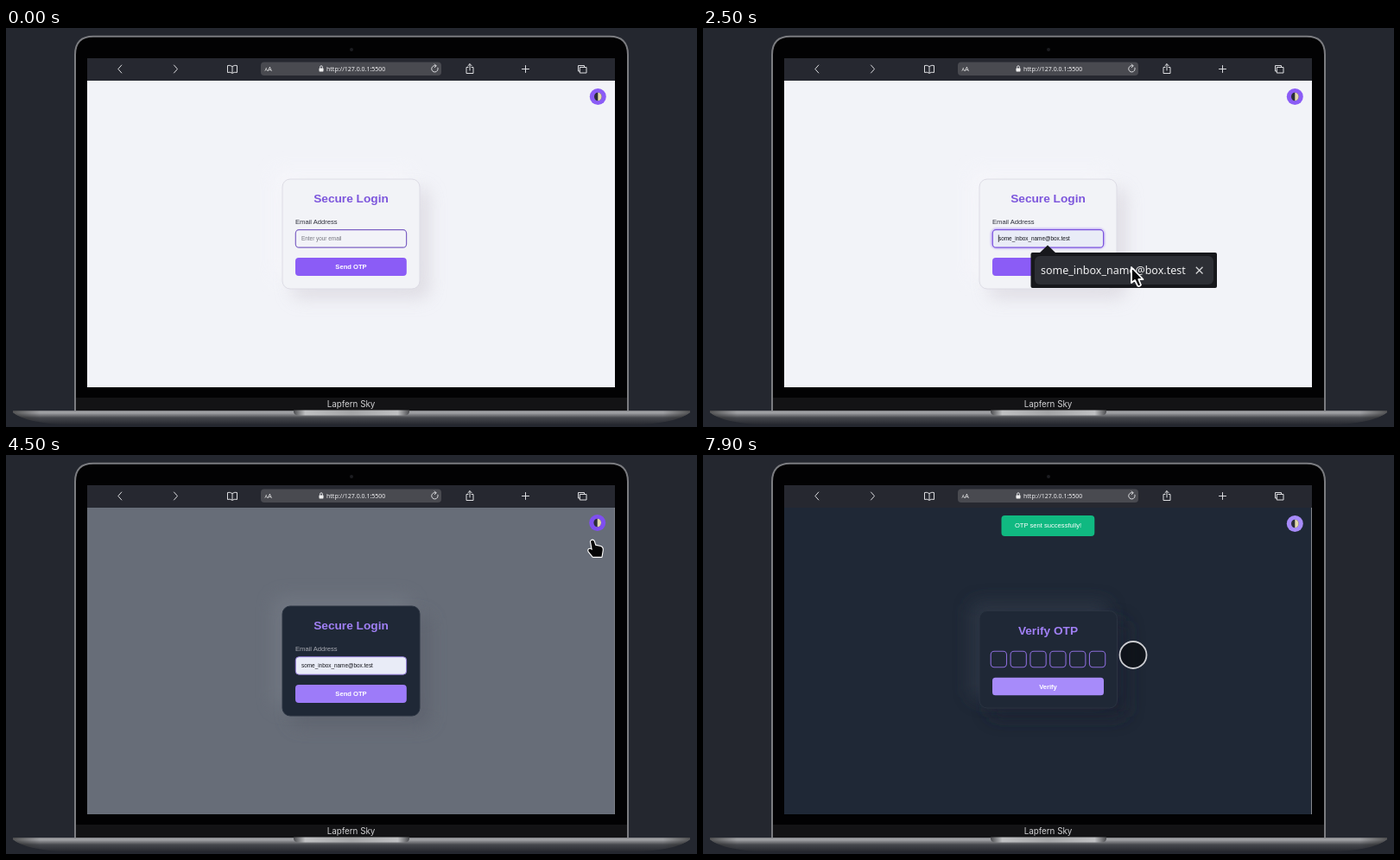
These frames come from a looping animation (800 px wide and 462 px high, 8000 ms). An HTML page:

```html
<!DOCTYPE html>
<html lang="en">
<head>
<meta charset="utf-8">
<title>Secure Login</title>
<style>
html, body { margin: 0; width: 100%; height: 100%; overflow: hidden; background: #24272f; }
svg { display: block; width: 100%; height: 100%; }
text { font-family: "Liberation Sans", Arial, sans-serif; font-size: 7.6px; }
.mid { text-anchor: middle; }
.bold { font-weight: 700; }
.title { font-size: 13.7px; font-weight: 700; text-anchor: middle; }
.small { font-size: 6.4px; }
.ui { font-family: "Noto Sans", "Open Sans", sans-serif; }
.line { fill: none; stroke: #dcdde0; stroke-width: 1; stroke-linecap: round; stroke-linejoin: round; }
</style>
</head>
<body>
<svg viewBox="0 0 800 462" xmlns="http://www.w3.org/2000/svg">
  <defs>
    <linearGradient id="metal" x2="0" y2="1">
      <stop offset="0" stop-color="#85868a"/><stop offset=".15" stop-color="#a3a4a7"/>
      <stop offset=".32" stop-color="#77787c"/><stop offset=".5" stop-color="#45474c"/>
      <stop offset="1" stop-color="#25272e"/>
    </linearGradient>
    <linearGradient id="ends">
      <stop offset="0" stop-color="#222" stop-opacity=".6"/><stop offset=".04" stop-color="#222" stop-opacity="0"/>
      <stop offset=".96" stop-color="#222" stop-opacity="0"/><stop offset="1" stop-color="#222" stop-opacity=".6"/>
    </linearGradient>
    <linearGradient id="notch">
      <stop offset="0" stop-color="#4c4d50"/><stop offset=".1" stop-color="#bfc0c2"/>
      <stop offset=".5" stop-color="#a4a5a7"/><stop offset=".9" stop-color="#bfc0c2"/><stop offset="1" stop-color="#4c4d50"/>
    </linearGradient>
    <filter id="blur" x="-40%" y="-40%" width="180%" height="180%"><feGaussianBlur stdDeviation="10"/></filter>
    <filter id="glow" x="-20%" y="-60%" width="140%" height="220%"><feGaussianBlur stdDeviation="1"/></filter>
    <clipPath id="screen"><rect x="94" y="61" width="611" height="355"/></clipPath>
    <clipPath id="lens"><circle cx="404" cy="273" r="15"/></clipPath>
  </defs>

  <!-- laptop -->
  <rect width="800" height="462" fill="#24272f"/>
  <path d="M80 443V31Q80 9.800 101 9.800H699Q720 9.800 720 31V443Z" fill="#020203" stroke="#7b7c80" stroke-width="2"/>
  <rect x="81" y="428" width="638" height="15" fill="#131315"/>
  <circle cx="400" cy="25" r="2" fill="#1c1d21"/>
  <text class="mid" x="399.500" y="438.700" fill="#d2d2d4" style="font:400 9.800px Inter,sans-serif">Lapfern Sky</text>
  <path d="M8 443H792V445Q778 457 730 459.500H70Q22 457 8 445Z" fill="url(#metal)"/>
  <path d="M8 443H792V445Q778 457 730 459.500H70Q22 457 8 445Z" fill="url(#ends)"/>
  <path d="M333 442.500H467V445Q466 448.500 461 448.500H339Q334 448.500 333 445Z" fill="url(#notch)"/>

  <!-- browser bar -->
  <rect x="94" y="35" width="611" height="26" fill="#262830"/>
  <rect x="295" y="39.500" width="209" height="15.500" rx="4" fill="#494a50"/>
  <text class="ui" x="299.500" y="50" fill="#eee" style="font-size:5.500px">A<tspan style="font-size:7.500px">A</tspan></text>
  <rect x="362.500" y="46.500" width="5" height="4" rx=".7" fill="#eee"/>
  <path class="line" d="M363.600 46.500V45.200a1.400 1.400 0 0 1 2.800 0V46.500"/>
  <text class="ui" x="371" y="49.600" fill="#f0f0f2" style="font-size:7px;font-weight:500">http://127.0.0.1:5500</text>
  <path class="line" d="M500 46.200a3.700 3.700 0 1 1-2.200-2.400M496.200 41.900L498.200 43.900L496.200 45.600"/>
  <path class="line" d="M133.800 43L129.800 47.500L133.800 52M194.500 43L198.500 47.500L194.500 52"/>
  <path class="line" d="M262 44.500Q259 42.500 256.500 43.500V51.500Q259 50.500 262 52.300Q265 50.500 267.500 51.500V43.500Q265 42.500 262 44.500V52"/>
  <path class="line" d="M535 45.500H533V52.500H541V45.500H539M537 49V41.700M534.800 43.800L537 41.600L539.200 43.800"/>
  <path class="line" d="M597.500 47.500H605.500M601.500 43.500V51.500"/>
  <path class="line" d="M664.500 50H662.500V43.500H669.500V45.500M664.700 45.500H672V52H664.700Z"/>

  <g clip-path="url(#screen)">
    <rect id="page" x="94" y="61" width="611" height="355"/>
    <rect id="edge" x="704" y="61" width="1" height="355" fill="#85888f"/>
    <g id="theme">
      <circle id="themeDisc" cx="685.300" cy="79.500" r="9.500"/>
      <ellipse cx="685.300" cy="79.500" rx="4.300" ry="4.800" fill="#2b2d38"/>
      <path d="M685.300 74.700a4.300 4.800 0 0 1 0 9.600Z" fill="#e3d9ac"/>
    </g>

    <g id="card">
      <rect id="shadeLow" class="frame" filter="url(#blur)" transform="translate(11 11)"/>
      <rect id="shadeHigh" class="frame" filter="url(#blur)" transform="translate(-10 -10)"/>
      <rect id="panel" class="frame"/>
      <g id="login">
        <text id="loginTitle" class="title" x="399.500" y="202.400">Secure Login</text>
        <text id="label" x="335" y="227.300">Email Address</text>
        <rect id="halo" x="334.500" y="233" width="129.500" height="21.500" rx="5" fill="none" stroke="#8b5cf6" stroke-width="2" filter="url(#glow)"/>
        <rect id="field" x="335.300" y="233.700" width="128.300" height="20.500" rx="4"/>
        <text id="hint" class="small" x="342" y="246" fill="#777780">Enter your email</text>
        <text id="mail" class="small" x="342" y="246" fill="#15161c">some_inbox_name@box.test</text>
        <path id="caret" d="M342.300 239.500V248" stroke="#222" stroke-width=".8"/>
        <rect id="send" x="335" y="266" width="128.800" height="21" rx="4"/>
        <text class="mid bold" x="399.500" y="278.800" fill="#fff">Send OTP</text>
      </g>
      <g id="verify">
        <text class="title" x="399.500" y="208.400" fill="#a180f6">Verify OTP</text>
        <g id="cells" fill="none" stroke="#8a6cd8" stroke-width="1.100"></g>
        <rect id="check" x="335" y="257.700" width="129" height="20.500" rx="3.500"/>
        <text class="mid bold" x="399.500" y="270.600" fill="#fff">Verify</text>
      </g>
    </g>

    <g id="toast">
      <rect x="345.500" y="70" width="107.800" height="24" rx="4" fill="#10b981"/>
      <text class="mid" x="399.500" y="84.300" fill="#fff">OTP sent successfully!</text>
    </g>

    <g id="popup">
      <path d="M389 261L399 251.500L409 261Z" fill="#17181c"/>
      <rect x="379.500" y="260" width="215.500" height="41" rx="2" fill="#17181c"/>
      <rect x="384" y="264" width="207" height="33" rx="6" fill="#2d2f35"/>
      <text class="ui" x="391" y="285" fill="#f0f0f1" style="font-size:12.500px;font-weight:500">some_inbox_name@box.test</text>
      <path d="M570.800 276.800L578.500 284.500M578.500 276.800L570.800 284.500" stroke="#d5d6d8" stroke-width="1.300"/>
    </g>

    <g id="cursor">
      <circle id="ring" r="15.500" fill="#08090d" fill-opacity=".64" stroke="#ededf0" stroke-opacity=".85" stroke-width="1.800"/>
      <path id="arrow" d="M0 0V18L4 15L7.200 21.500Q9 23 11 20.500L8.300 14H13.500Z" fill="#08080a" stroke="#fff" stroke-width="1.800" stroke-linejoin="round"/>
      <path id="hand" d="M-5 -8Q-3.300 -10.500 -1.300 -8.300L.3 -3.300L6.500 -2Q9.200 -1 8.700 2.500L7.500 9.800H-2.500L-7.500 3.500Q-8.300 .5 -5.500 .8L-3.200 2.200Z" fill="#050506" stroke="#fff" stroke-width="2.200" stroke-linejoin="round" paint-order="stroke"/>
    </g>
    <text id="tint" class="mid bold" x="399.500" y="275.800" fill="#a04a70" clip-path="url(#lens)">Send OTP</text>
  </g>
</svg>
<script>
const LOOP = 8000, STEP = 100;
const el = {};
document.querySelectorAll("[id]").forEach(n => el[n.id] = n);
const frames = document.querySelectorAll(".frame");

// time, x, y of the pointer
const path = [
  [100, 520, 436], [700, 386, 240.5], [1600, 386, 240.5], [2100, 499, 291],
  [2400, 496, 277], [2800, 496, 277], [3600, 668, 138], [3700, 684, 127],
  [4000, 685, 97], [4300, 685, 97], [4500, 682, 108], [5400, 428, 270],
  [5500, 404, 273], [7200, 404, 273], [7600, 507, 227], [7900, 498, 231.5]
];

for (let i = 0; i < 6; i++) {
  const cell = document.createElementNS("http://www.w3.org/2000/svg", "rect");
  set(cell, { x: 333.2 + 22.85 * i, y: 227.2, width: 18.3, height: 18.5, rx: 4 });
  el.cells.append(cell);
}

function set(node, attrs) {
  for (const k in attrs) node.setAttribute(k, attrs[k]);
}
function show(node, on) {
  node.setAttribute("visibility", on ? "visible" : "hidden");
}
function ramp(t, start, length) {
  return Math.min(1, Math.max(0, (t - start) / length));
}
function smooth(k) {
  return k * k * (3 - 2 * k);
}
function mix(a, b, k) {
  const part = (s, i) => parseInt(s.slice(i, i + 2), 16);
  return "rgb(" + [1, 3, 5].map(i => Math.round(part(a, i) + (part(b, i) - part(a, i)) * k)) + ")";
}
function pointAt(t) {
  let i = 0;
  while (i < path.length - 2 && t >= path[i + 1][0]) i++;
  const [t0, x0, y0] = path[i], [t1, x1, y1] = path[i + 1];
  const k = smooth(ramp(t, t0, t1 - t0));
  return [x0 + (x1 - x0) * k, y0 + (y1 - y0) * k];
}

function drawCard(t) {
  const dark = ramp(t, 4200, 455), quick = ramp(t, 4200, 150);
  const verify = t >= 6500, filled = t >= 2100;
  const focus = t >= 1000 && t < 4200;
  const lift = smooth(ramp(t, 500, 300)) - smooth(ramp(t, 1900, 300))
    + smooth(ramp(t, 5000, 300)) - smooth(ramp(t, 7400, 300));

  set(el.page, { fill: mix("#f2f3f8", "#1f2836", dark) });
  set(el.edge, { opacity: dark });
  const over = t >= 3900 && t < 4600;
  set(el.themeDisc, { fill: over ? "#7f4ff0" : mix("#8b5cf6", "#a78bfa", dark) });
  set(el.theme, { transform: over ? "translate(-.6 -1)" : "" });

  set(el.card, { transform: `translate(0 ${-3 * lift})` });
  const box = verify
    ? { x: 320, y: 180.5, width: 159.5, height: 112.5, rx: 9 }
    : { x: 320, y: 175, width: 159, height: 127, rx: 9 };
  frames.forEach(f => set(f, box));
  set(el.shadeLow, { fill: mix("#d8d5dd", "#1c2431", dark), opacity: .75 });
  set(el.shadeHigh, { fill: mix("#f7f7fb", "#303a48", dark), opacity: .75 });
  set(el.panel, {
    fill: mix("#f2f3f7", "#1f2836", quick),
    stroke: mix("#dddce5", "#2a3341", quick), "stroke-width": 1
  });

  show(el.login, !verify);
  show(el.verify, verify);
  set(el.loginTitle, { fill: mix("#7c55dc", "#a180f6", quick) });
  set(el.label, { fill: mix("#2c2e3a", "#e6e8ee", dark) });
  set(el.field, {
    fill: filled ? "#e9ecf7" : "#f2f3f8",
    stroke: focus ? "#7c55dd" : mix("#7d62c4", "#9a80e6", dark),
    "stroke-width": 1.2 - .3 * quick
  });
  set(el.halo, { opacity: focus ? .55 : 0 });
  set(el.hint, { opacity: filled ? 0 : 1 });
  set(el.mail, { opacity: filled ? 1 : 0 });
  set(el.caret, { opacity: t >= 1200 && t < 2800 ? 1 : 0 });
  const hover = ramp(t, 5200, 200);
  set(el.send, { fill: t < 5200 ? mix("#8b5cf6", "#a78bfa", dark) : mix("#a78bfa", "#8b5cf6", hover) });
  set(el.check, { fill: mix("#8b5cf6", "#a78bfa", ramp(t, 7300, 200)) });
}

function drawPointer(t) {
  const [x, y] = pointAt(t);
  const arrow = t >= 2000 && t < 3000;
  const hand = t >= 3700 && t < 4700;
  set(el.cursor, { transform: `translate(${x} ${y})` });
  const on = t >= 100;
  show(el.arrow, on && arrow);
  show(el.hand, on && hand);
  show(el.ring, on && !arrow && !hand);
  show(el.tint, t >= 5500 && t < 6500);
}

function draw(t) {
  drawCard(t);
  show(el.popup, t >= 1300 && t < 2900);
  const rise = smooth(ramp(t, 6500, 300));
  set(el.toast, { opacity: rise, transform: `translate(0 ${-20 * (1 - rise)})` });
  drawPointer(t);
}

const begin = performance.now();
function tick(now) {
  const t = Math.max(0, now - begin) % LOOP;
  draw(Math.floor(t / STEP) * STEP);
  requestAnimationFrame(tick);
}
draw(0);
requestAnimationFrame(tick);
</script>
</body>
</html>
```
